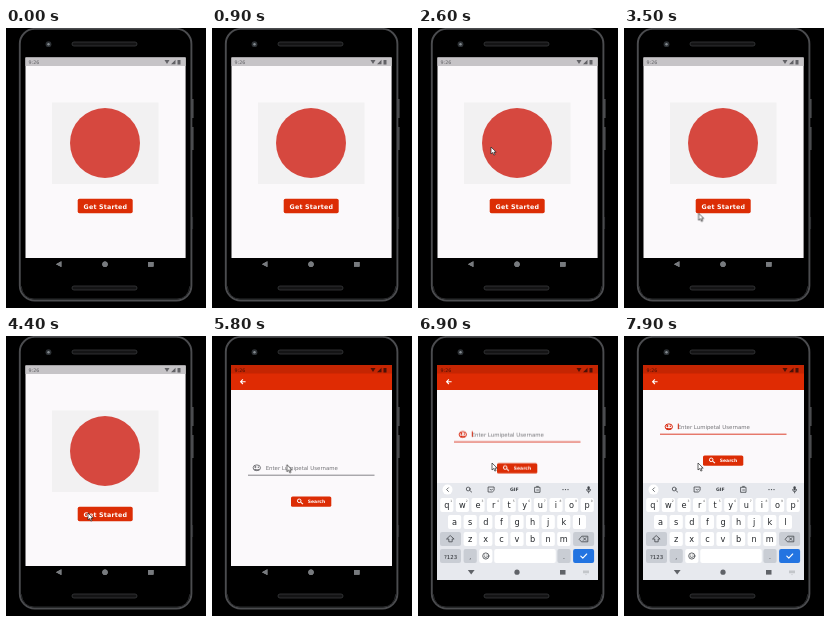
Write an HTML page that moves like this. It is 200x280 px and loops after 8000 ms.

```html
<!DOCTYPE html>
<html lang="en">
<head>
<meta charset="utf-8">
<title>Phone app walkthrough</title>
<style>
html, body { margin: 0; width: 100%; height: 100%; overflow: hidden; background: #000; }
svg { display: block; width: 200px; height: 280px; font-family: "DejaVu Sans", sans-serif; }
.bold { font-weight: bold; fill: #fff; }
.key { font-size: 8.2px; text-anchor: middle; fill: #24272b; }
.hint { font-size: 3px; text-anchor: middle; fill: #555; }
.line { fill: none; stroke: #42464b; stroke-width: .8; stroke-linecap: round; stroke-linejoin: round; }
.tick { stroke: #fff; stroke-width: 1.1; }
#search, #form, #board, #cursor, #caret, #focus, .light, .dark { animation: 8s linear infinite both; }

#search { animation-name: open; }
@keyframes open {
  0%, 58% { opacity: 0; transform: translateY(10px); animation-timing-function: ease-out; }
  62%, 100% { opacity: 1; transform: none; }
}
#board { animation-name: rise; }
@keyframes rise {
  0%, 80% { transform: translateY(98px); animation-timing-function: ease-out; }
  83.75% { transform: translateY(41px); animation-timing-function: ease-out; }
  86.25%, 100% { transform: none; }
}
#form { animation-name: shift; }
@keyframes shift {
  0%, 85% { transform: none; animation-timing-function: ease-out; }
  87%, 100% { transform: translateY(-41px); }
}
#focus { animation-name: focus; color: #77777b; }
@keyframes focus {
  0%, 77.5% { color: #77777b; }
  79.5%, 100% { color: #d92b12; }
}
#caret { animation-name: caret; animation-timing-function: step-end; }
@keyframes caret {
  0% { opacity: 0; }
  78.75% { opacity: 1; }
  93.75% { opacity: 0; }
  98.75%, 100% { opacity: 1; }
}
.light { animation-name: leave; animation-timing-function: step-end; }
.dark { animation-name: enter; animation-timing-function: step-end; }
@keyframes leave { 0% { opacity: 1; } 86.25%, 100% { opacity: 0; } }
@keyframes enter { 0% { opacity: 0; } 86.25%, 100% { opacity: 1; } }
#cursor { animation-name: point; }
@keyframes point {
  0%, 28.7% { opacity: 0; transform: translate(62px, 111px); }
  28.75% { opacity: 1; transform: translate(62px, 111px); }
  32%, 33.5% { transform: translate(73px, 119px); }
  38% { transform: translate(33px, 236px); }
  41% { transform: translate(58px, 204px); }
  45%, 67.5% { transform: translate(82px, 177px); animation-timing-function: ease-in-out; }
  72% { transform: translate(75px, 129px); }
  75%, 100% { opacity: 1; transform: translate(74px, 127px); }
}
</style>
</head>
<body>
<svg viewBox="0 0 200 280">
  <defs>
    <clipPath id="glass"><rect x="19.5" y="29.6" width="160.1" height="214.4"/></clipPath>
    <g id="status">
      <text x="22.5" y="36.2" font-size="4.8">9:26</text>
      <path d="M158.5 32h5l-2.5 4zM169.5 31.8v4.4H165zM171.5 32h3v4.4h-3z"/>
    </g>
    <g id="dots"><circle cx="99" cy="236.2" r="2.6"/><rect x="142" y="234" width="5.5" height="4.6"/></g>
    <rect id="slot" x="66" width="65" height="4" rx="2" fill="#141415" stroke="#38393b" stroke-width=".8"/>
  </defs>

  <rect width="200" height="280"/>
  <path d="M186.8 71v19M186.8 99v23" stroke="#505254" stroke-width="1.5"/>
  <path d="M186.6 189v12" stroke="#27282a"/>
  <rect x="13.8" y=".9" width="171.6" height="271.6" rx="15" stroke="#4b4c4f" stroke-width="1.9"/>
  <path d="M15 258q2 13 13 13h143q11 0 13-13" fill="none" stroke="#2b2c2e"/>
  <use href="#slot" y="14"/>
  <use href="#slot" y="258"/>
  <circle cx="42.5" cy="16.2" r="2.9" fill="#2c3034"/>
  <circle cx="42.5" cy="16.2" r="1.2" fill="#858b91"/>

  <g clip-path="url(#glass)">
    <rect x="19" y="29" width="161" height="201" fill="#fbf9fb"/>
    <rect x="19" y="230" width="161" height="14"/>
    <rect x="19" y="29" width="161" height="9" fill="#c6c4c7"/>
    <use href="#status" fill="#626266"/>
    <rect x="46" y="74.5" width="106.5" height="81.5" fill="#f2f1f2"/>
    <circle cx="99" cy="115" r="35" fill="#d6483f"/>
    <rect x="71.7" y="170.8" width="55" height="14.4" rx="1.8" fill="#dc2d05"/>
    <text class="bold" x="77.6" y="180.5" font-size="6.3" letter-spacing=".2">Get Started</text>

    <g id="search">
      <rect x="19" y="29" width="161" height="201" fill="#fbf9fb"/>
      <rect x="19" y="29" width="161" height="25" fill="#df2b03"/>
      <rect x="19" y="29" width="161" height="8.5" fill="#c52502"/>
      <use href="#status" fill="#4c1007"/>
      <path d="M33.6 45.7h-5m2.3-2.3-2.3 2.3 2.3 2.3" fill="none" stroke="#fff" stroke-width="1.1"/>
      <g id="form">
        <g id="focus">
          <path d="M36 139.2h126.5" stroke="currentColor" stroke-width=".9"/>
          <ellipse cx="44.8" cy="131.8" rx="3.7" ry="2.9" fill="none" stroke="currentColor"/>
          <circle cx="43.4" cy="131" r="1" fill="currentColor"/>
          <circle cx="46.4" cy="131.2" r=".8" fill="currentColor"/>
          <path d="M41.7 133.6q1.8-1.6 3.2 0 1.5-1.4 2.9 0l-1.6 1.1h-3z" fill="currentColor"/>
        </g>
        <text x="53.7" y="133.5" font-size="5.4" fill="#747478">Enter Lumipetal Username</text>
        <path id="caret" d="M54.3 128.6v5.6" stroke="#d92b12"/>
        <rect x="79" y="160.4" width="40.3" height="10.4" rx="1.6" fill="#dc2d05"/>
        <circle cx="87.2" cy="164.8" r="1.8" fill="none" stroke="#fff"/>
        <path d="M88.6 166.1l2.4 2" stroke="#fff" stroke-width="1.1"/>
        <text class="bold" x="95.8" y="167.3" font-size="4.5">Search</text>
      </g>
    </g>

    <g class="light" fill="#a5a7a9"><path d="M50 236.2l5.4-2.9v5.8z"/><use href="#dots"/></g>
    <g id="board">
      <rect x="19" y="147" width="161" height="97" fill="#e7e9ee"/>
      <g id="keys"></g>
      <circle cx="29.5" cy="153.6" r="5" fill="#fff"/>
      <path class="line" d="M30.4 151.8l-1.8 1.8 1.8 1.8"/>
      <g class="line">
        <circle cx="50.2" cy="153" r="1.9"/><path d="M51.7 154.4l2 1.7"/>
        <path d="M70.5 151h5.6v3.4l-1.8 1.6h-3.8zM72 153.5q1.2 1.4 2.5 0"/>
        <path d="M117 151.3h5v5h-5zM118.6 150.4h1.8M118.7 154h1.8"/>
        <path d="M168.6 153.5q0 2.2 2 2.2t2-2.2M170.6 155.7v1.2"/>
      </g>
      <text x="96.3" y="155.4" font-size="4.6" font-weight="bold" text-anchor="middle" fill="#3b3f44">GIF</text>
      <g fill="#42464b">
        <circle cx="145" cy="153.6" r=".7"/><circle cx="147.5" cy="153.6" r=".7"/><circle cx="150" cy="153.6" r=".7"/>
        <rect x="169.5" y="150.2" width="2.2" height="4.3" rx="1.1"/>
      </g>
    </g>
    <g class="light" fill="#777a7e" opacity=".45"><path d="M50 236.2l5.4-2.9v5.8z"/><use href="#dots"/></g>
    <g class="dark" fill="#606368"><path d="M49.8 234h6.8l-3.4 4.5z"/><use href="#dots"/><path d="M165 234.5h6v2.8h-6zM167 238.2h2l-1 1z" fill="#c3c6ca"/></g>
  </g>

  <path id="cursor" d="M0 0v7l1.7-1.5 1.2 2.6 1.2-.6-1.2-2.4h2.3z" fill="#fff" stroke="#222" stroke-width=".7"/>
</svg>
<script>
const keys = document.getElementById('keys');
const grey = '#c9cdd4';
let markup = '';

function key(x, y, w, label = '', fill = '#fff', size = 8.2) {
  markup += `<rect x="${x - w / 2}" y="${y - 6.9}" width="${w}" height="13.8" rx="2" fill="${fill}"/>`;
  markup += `<text class="key" x="${x}" y="${y + 2.6}" style="font-size:${size}px">${label}</text>`;
}

function row(letters, start, y) {
  [...letters].forEach((c, i) => key(start + i * 15.6, y, 13.2, c));
}

row('qwertyuiop', 28.8, 169);
row('asdfghjkl', 36.6, 186);
row('zxcvbnm', 52.2, 203);
[...'1234567890'].forEach((n, i) => {
  markup += `<text class="hint" x="${33.2 + i * 15.6}" y="165.6">${n}</text>`;
});
key(32.5, 203, 21, '', grey);
key(165.6, 203, 21, '', grey);
key(32.5, 220, 21, '?123', grey, 5.4);
key(52.2, 220, 13.2, ',', grey, 6);
key(67.8, 220, 13.2);
key(107, 220, 61.5);
key(146, 220, 13.2, '.', grey, 6);
key(165.6, 220, 21, '', '#2374e1');

// Symbols on the special keys
markup += `<g class="line">
  <path d="M32.5 199.8l3.6 3.2h-1.9v2.8h-3.4V203h-1.9z"/>
  <path d="M161.4 203l2.4-2.8h6v5.6h-6zM165.4 201.7l2.5 2.6m0-2.6l-2.5 2.6"/>
  <circle cx="67.8" cy="220" r="3.1"/><path d="M66.2 220.8q1.6 1.7 3.2 0M66.7 219v.1M68.9 219v.1"/>
  <path class="tick" d="M162.8 220.1l2 2 3.9-4.1"/>
</g>`;
keys.innerHTML = markup;
</script>
</body>
</html>
```
